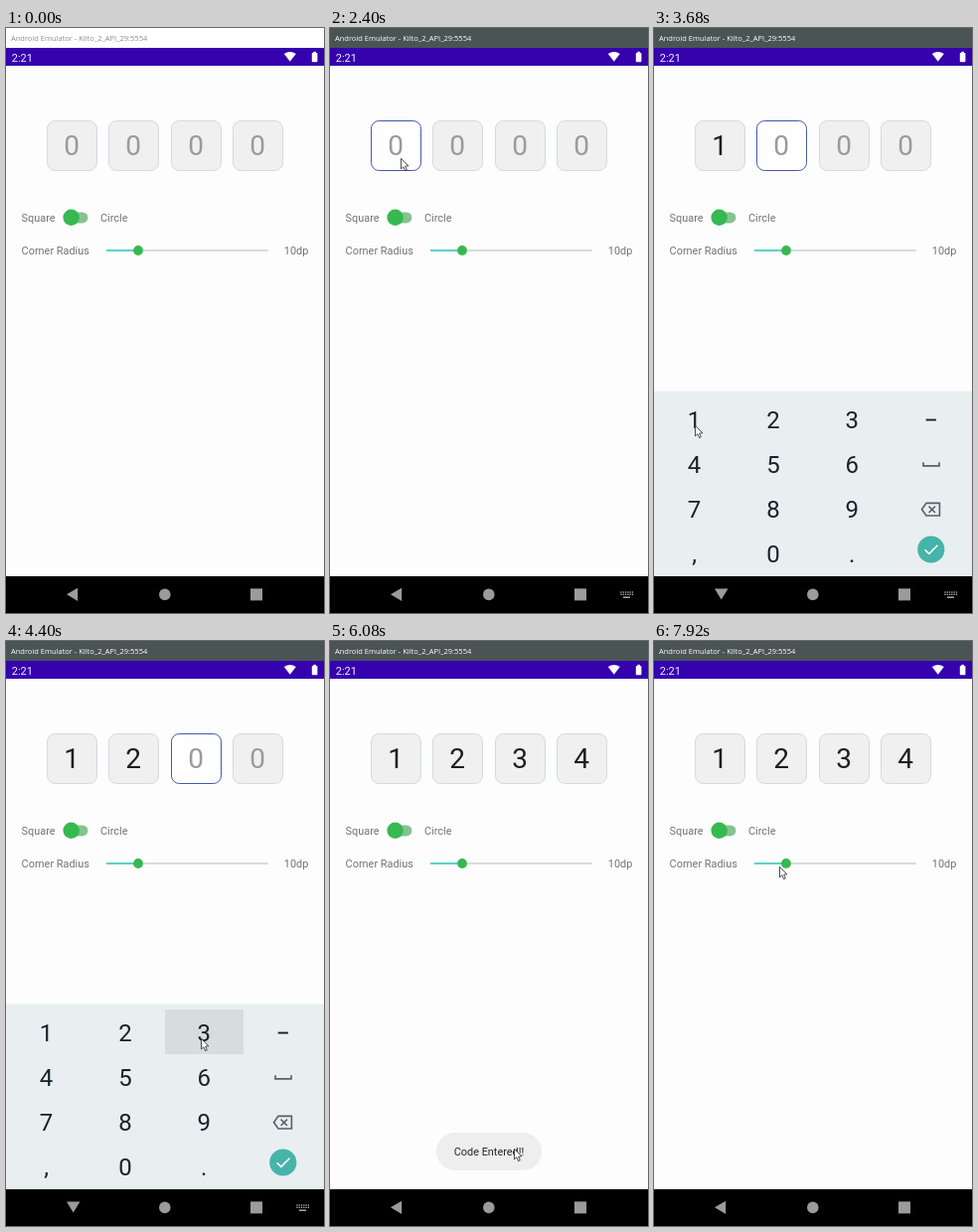
An HTML page with a canvas that plays this animation: 320 by 589 pixels, repeating every 8000 ms.

```html
<!DOCTYPE html>
<html lang="en">
<head>
<meta charset="utf-8">
<title>Code entry</title>
<style>
html, body { margin: 0; width: 100%; height: 100%; overflow: hidden; background: #fdfdfd; }
canvas { display: block; width: 320px; height: 589px; }
</style>
</head>
<body>
<canvas id="stage"></canvas>
<script>
const W = 320, H = 589, LOOP = 8000, STEP = 80;
const KEYS_TOP = 365.5, NAV_TOP = 552, KEY_W = 79.3, KEY_H = 45.1;
const ROBOTO = 'Roboto, "Noto Sans", sans-serif';
const TITLE = '"Open Sans", "Noto Sans", sans-serif';
const GREEN = '#35b950', NAV = '#9b9b9b', GRAY = '#737373', ICON = '#526268';

const canvas = document.getElementById('stage');
const ctx = canvas.getContext('2d');
const dpr = window.devicePixelRatio || 1;
canvas.width = W * dpr;
canvas.height = H * dpr;

// The code 1234 is typed with one press per digit
const presses = [3520, 4000, 4400, 5280];
const cell = i => [i % 3, Math.floor(i / 3)];

// Places the pointer visits
const box = [71, 131], toggle = [66, 189], slider = [126, 227], toast = [185, 511];
const key = i => {
  const [col, row] = cell(i);
  return [41 + col * 77.5, 400 + row * 43];
};

// Pointer moves: departure, arrival, destination; it rests in between
const moves = [
  [800, 880, [18, 160]], [880, 1040, [39, 138]], [1280, 1600, [10, 184]],
  [1600, 2080, box], [2400, 3120, [50, 410]],
  [3200, 3440, key(0)], [3760, 4000, key(1)], [4080, 4320, key(2)], [4560, 5120, key(3)],
  [5360, 6080, toast], [6080, 6960, toggle], [6960, 7040, [126, 213]],
  [7200, 7440, toggle], [7520, 7920, slider]
];

const ramp = (t, a, b) => Math.max(0, Math.min(1, (t - a) / (b - a)));
const ease = u => u * u * (3 - 2 * u);
const mix = (a, b, u) => a + (b - a) * u;

function rect(x, y, w, h, color) {
  ctx.fillStyle = color;
  ctx.fillRect(x, y, w, h);
}

function pill(x, y, w, h, r, fill, edge) {
  ctx.beginPath();
  ctx.roundRect(x, y, w, h, r);
  ctx.fillStyle = fill;
  ctx.fill();
  if (edge) {
    ctx.strokeStyle = edge;
    ctx.lineWidth = 1;
    ctx.stroke();
  }
}

function disc(x, y, r, color) {
  ctx.beginPath();
  ctx.arc(x, y, r, 0, Math.PI * 2);
  ctx.fillStyle = color;
  ctx.fill();
}

function trace(pts, close) {
  ctx.beginPath();
  pts.forEach(([x, y]) => ctx.lineTo(x, y));
  if (close) ctx.closePath();
}

function shape(pts, color) {
  trace(pts, true);
  ctx.fillStyle = color;
  ctx.fill();
}

function line(pts, color, width, close) {
  trace(pts, close);
  ctx.strokeStyle = color;
  ctx.lineWidth = width;
  ctx.stroke();
}

function text(s, x, y, size, color, align = 'left', family = ROBOTO) {
  ctx.font = size + 'px ' + family;
  ctx.textAlign = align;
  ctx.fillStyle = color;
  ctx.fillText(s, x, y);
}

function drawBars(active) {
  rect(0, 0, W, 20, active ? '#4a5454' : '#ffffff');
  text('Android Emulator - Kilto_2_API_29:5554', 5, 12.6, 7.5,
    active ? '#ffffff' : '#8c8c8c', 'left', TITLE);
  rect(0, 20, W, 18, '#3502ae');
  text('2:21', 5.7, 33.6, 11, '#f4f0ff');
  ctx.beginPath();
  ctx.moveTo(285.8, 33.8);
  ctx.lineTo(279.8, 26.1);
  ctx.quadraticCurveTo(285.8, 21.8, 291.8, 26.1);
  ctx.fillStyle = '#ffffff';
  ctx.fill();
  rect(309.3, 23.8, 2.6, 2, '#ffffff');
  pill(307.8, 25, 5.6, 9.2, 0.7, '#ffffff');
}

function drawBoxes(count, focus) {
  for (let i = 0; i < 4; i++) {
    const x = 41.5 + Math.round(i * 62.4), on = i === focus, typed = i < count;
    pill(x, 93.5, 50, 50, 7.8, on ? '#fefefe' : '#f0f0f0', on ? '#4358ac' : '#d3dbdc');
    text(typed ? i + 1 : 0, x + 24.7, 128, 28, typed ? '#1f1f1f' : '#9a9a9a', 'center');
  }
}

function drawControls() {
  text('Square', 15.6, 195, 10.9, GRAY);
  text('Circle', 95, 195, 10.9, GRAY);
  pill(60, 185.4, 22.4, 11, 5.5, '#86c391');
  disc(65.6, 190.8, 8.2, GREEN);
  text('Corner Radius', 15.6, 228.3, 10.9, GRAY);
  rect(101, 223.2, 163, 1.6, '#d4d4d4');
  rect(101, 223.2, 32, 1.6, '#3fd0c4');
  disc(133, 224, 4.9, GREEN);
  text('10dp', 304.3, 228.3, 10.9, GRAY, 'right');
}

function drawToast(alpha) {
  ctx.globalAlpha = alpha;
  pill(107, 495, 106, 38, 19, '#eeeeee');
  text('Code Entered!!', 160, 518, 10.9, '#252525', 'center');
  ctx.globalAlpha = 1;
}

function drawKeyboard(shown, pressed) {
  if (!shown) return;
  const ink = '#15242a', white = '#ffffff';
  ctx.save();
  ctx.translate(0, (1 - shown) * (NAV_TOP - KEYS_TOP));
  rect(0, KEYS_TOP, W, H, '#e9eff0');
  if (pressed >= 0) {
    const [col, row] = cell(pressed);
    rect(1 + Math.round(col * KEY_W), 371 + row * KEY_H, 79, 45, '#d7dddd');
  }
  ['123', '456', '789', ',0.'].forEach((keys, row) =>
    [...keys].forEach((c, col) =>
      text(c, 40.6 + col * KEY_W, 403 + row * KEY_H, 24, ink, 'center')));
  rect(273.7, 393.6, 10.2, 1.9, ink);

  // Icons share the centre of the last column
  ctx.translate(278.8, 0);
  line([[-7.8, 437.2], [-7.8, 440.9], [8.2, 440.9], [8.2, 437.2]], ICON, 1.7);
  line([[-9.3, 484.7], [-4.8, 478.4], [8.6, 478.4], [8.6, 491], [-4.8, 491]], ICON, 1.6, true);
  for (const d of [-3.2, 3.2]) line([[1 - d, 481.6], [1 + d, 488]], ICON, 1.5);
  disc(0, 525, 13.6, '#46b4aa');
  line([[-6.2, 525.4], [-2, 529.4], [6.6, 520.8]], white, 1.5);
  ctx.restore();
}

function drawNav(down, icon) {
  rect(0, NAV_TOP, W, H - NAV_TOP, '#000000');
  shape(down ? [[61, 564.5], [74.5, 564.5], [67.7, 575.5]]
             : [[61, 570.3], [72.2, 563.7], [72.2, 577]], NAV);
  disc(159.8, 570.4, 5.8, NAV);
  rect(246, 564.4, 12, 12, NAV);
  if (!icon) return;
  for (let i = 0; i < 12; i++)
    rect(292.3 + (i % 6) * 2.3, i < 6 ? 567.4 : 569.7, 1.3, 1.3, '#b5b5b5');
  rect(295, 572.5, 7, 1.4, '#b5b5b5');
}

function drawPointer(t) {
  const k = moves.findLastIndex(m => m[0] <= t);
  if (k < 0 || t < moves[0][1]) return;
  const [from, to, spot] = moves[k];
  const prev = k ? moves[k - 1][2] : spot;
  const u = ease(ramp(t, from, to));
  ctx.save();
  ctx.translate(mix(prev[0], spot[0], u) + 0.5, mix(prev[1], spot[1], u) + 0.3);
  ctx.lineJoin = 'round';
  const arrow = [[0, 0], [0, 10.6], [2.4, 8.5], [4.1, 12.4], [5.8, 11.6], [4.2, 7.8], [7.4, 7.6]];
  shape(arrow, '#ffffff');
  line(arrow, '#222222', 0.8, true);
  ctx.restore();
}

function draw(t) {
  const count = presses.filter(p => t >= p + STEP).length;
  const pressed = presses.findIndex(p => t >= p && t < p + STEP);
  const active = t >= 2160;

  ctx.setTransform(dpr, 0, 0, dpr, 0, 0);
  rect(0, 0, W, H, '#fdfdfd');
  drawBars(active);
  drawBoxes(count, active ? count : -1);
  drawControls();
  drawToast(ramp(t, 5440, 5760) - ramp(t, 7520, 7840));
  drawKeyboard(ease(ramp(t, 2400, 2720)) - ease(ramp(t, 5360, 5600)), pressed);
  drawNav(t >= 2480 && t < 5440, t >= 2400 && t < 5600);
  drawPointer(t);
}

const start = performance.now();
function tick(now) {
  const t = Math.max(0, now - start) % LOOP;
  draw(Math.floor(t / STEP) * STEP);
  requestAnimationFrame(tick);
}
draw(0);
requestAnimationFrame(tick);
</script>
</body>
</html>
```
